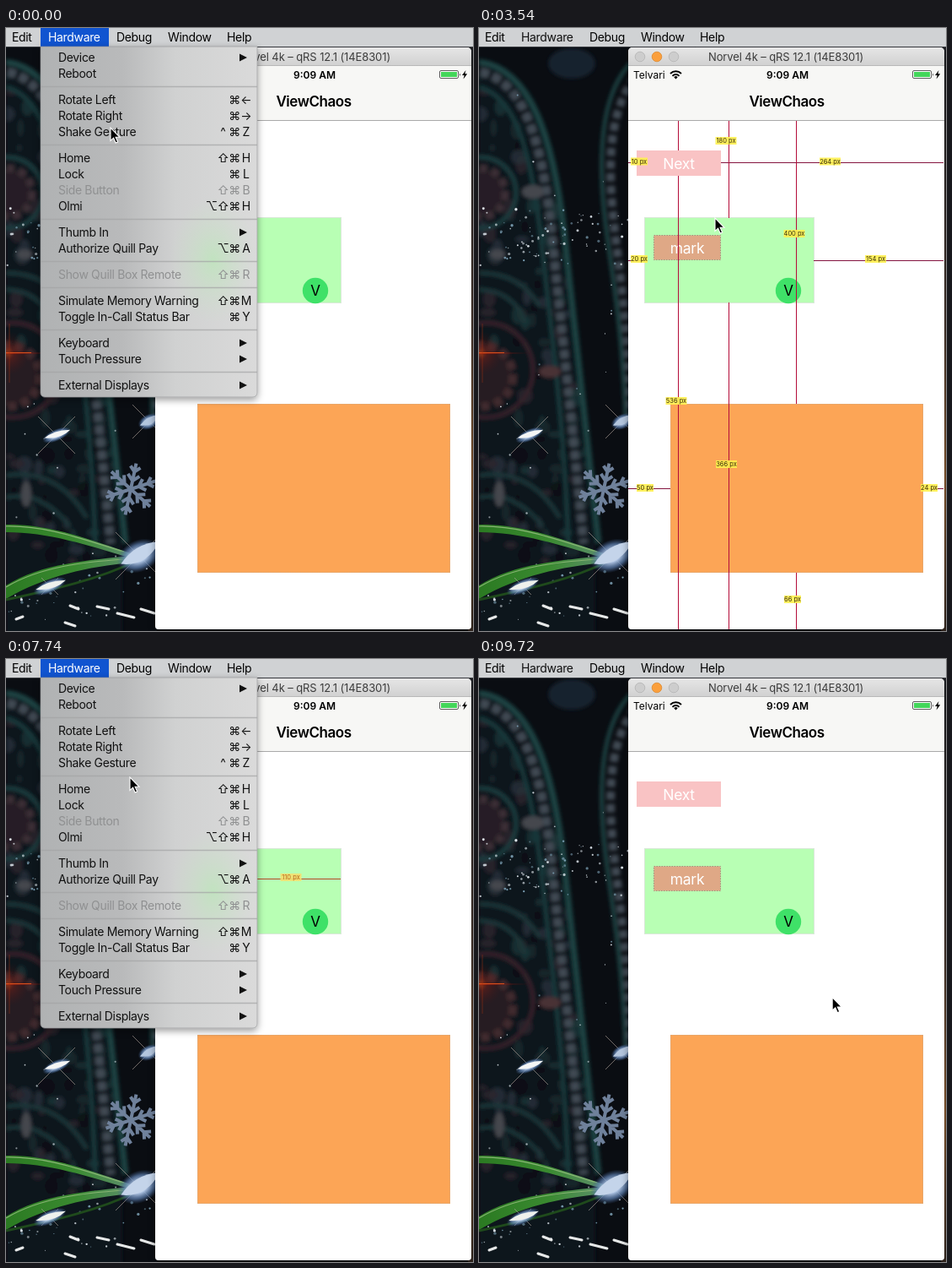
Recreate the animation shown at these times as an HTML page. Size 554x714 px, loop 9.78 s.

```html
<!DOCTYPE html>
<html lang="en">
<head>
<meta charset="utf-8">
<title>ViewChaos</title>
<style>
  html, body { margin: 0; width: 100%; height: 100%; overflow: hidden; background: #0b0f15; }
  svg { display: block; width: 554px; height: 714px; font-family: Inter, Roboto, sans-serif; }
  text { white-space: pre; }
  .menu { font-size: 14px; letter-spacing: -.34px; }
  .keys { font-family: Inter, "DejaVu Sans", sans-serif; text-anchor: middle; letter-spacing: 0; }
  .cjk { font-family: "Noto Sans CJK SC", "Noto Sans CJK", sans-serif; font-size: 17px; text-anchor: middle; }
  .tag { font-size: 7.5px; text-anchor: middle; }
  .mid { text-anchor: middle; }
</style>
</head>
<body>
<svg id="stage" viewBox="0 0 554 714" xmlns="http://www.w3.org/2000/svg">
  <defs>
    <linearGradient id="sheet">
      <stop offset="0" stop-color="#b0b2b3"/><stop offset=".38" stop-color="#b9babb"/>
      <stop offset=".62" stop-color="#d0d1d1"/><stop offset="1" stop-color="#dadada"/>
    </linearGradient>
    <linearGradient id="bar" x2="0" y2="1">
      <stop offset="0" stop-color="#e6e6e6"/><stop offset="1" stop-color="#d0d0d0"/>
    </linearGradient>
    <linearGradient id="edge" x2="0" y2="1">
      <stop offset="0" stop-color="#1a1d22"/><stop offset=".5" stop-color="#46352c"/>
      <stop offset=".75" stop-color="#8a5a30"/><stop offset="1" stop-color="#33261e"/>
    </linearGradient>
    <linearGradient id="leaf">
      <stop offset="0" stop-color="#2b7a22"/><stop offset=".55" stop-color="#3a8a30"/><stop offset="1" stop-color="#5d8f6c"/>
    </linearGradient>
    <radialGradient id="glow">
      <stop offset="0" stop-color="#aef0aa" stop-opacity=".5"/><stop offset="1" stop-color="#c8e8c4" stop-opacity="0"/>
    </radialGradient>
    <radialGradient id="flare">
      <stop offset="0" stop-color="#ff5a14"/><stop offset=".3" stop-color="#a02010" stop-opacity=".6"/>
      <stop offset="1" stop-color="#601010" stop-opacity="0"/>
    </radialGradient>
    <radialGradient id="ice">
      <stop offset="0" stop-color="#fff"/><stop offset=".35" stop-color="#b9cdea"/>
      <stop offset=".7" stop-color="#5f82b4" stop-opacity=".7"/><stop offset="1" stop-color="#3c5a8a" stop-opacity="0"/>
    </radialGradient>
    <filter id="soft"><feGaussianBlur stdDeviation="1.9"/></filter>
    <filter id="fine"><feGaussianBlur stdDeviation=".6"/></filter>
    <filter id="shade" x="-10%" y="-10%" width="120%" height="120%">
      <feDropShadow dx="0" dy="3" stdDeviation="4" flood-opacity=".4"/>
    </filter>
    <clipPath id="wall"><rect y="22" width="554" height="692"/></clipPath>
    <clipPath id="nave"><path d="M0 42C62 50 84 130 97 240S124 480 138 610V640H0Z"/></clipPath>
    <clipPath id="screen"><path d="M177 45H552V708a4 4 0 0 1-4 4H181a4 4 0 0 1-4-4Z"/></clipPath>
  </defs>

  <g id="back" clip-path="url(#wall)">
    <rect width="554" height="714" fill="#0a0d12"/>
    <rect x="548" width="6" height="714" fill="url(#edge)"/>
    <g filter="url(#soft)" fill="none">
      <path d="M0 42C62 50 84 130 97 240S124 480 138 610V720H0Z" fill="#11171d"/>
      <g id="blobs" clip-path="url(#nave)"></g>
      <path d="M0 40C62 48 88 130 101 240S128 480 142 610" stroke="#1b4243" stroke-width="7"/>
      <path d="M0 70C48 82 64 160 76 270S100 460 106 610" stroke="#17393b" stroke-width="5"/>
      <path d="M2 52C56 64 76 140 87 250S112 480 124 610" stroke="#414a52" stroke-width="10" stroke-dasharray="10 5"/>
      <path d="M182 40C150 70 142 130 147 200S168 320 174 460" stroke="#1a3f41" stroke-width="5"/>
      <path d="M186 58C160 90 152 140 158 210S176 320 180 460" stroke="#414a52" stroke-width="10" stroke-dasharray="10 5"/>
      <circle cx="2" cy="195" r="42" stroke="#1a3a3c" stroke-width="5"/>
      <circle cx="2" cy="195" r="29" fill="#281f25" stroke="#3a2f36" stroke-width="9" stroke-dasharray="9 6"/>
      <circle cx="8" cy="405" r="56" stroke="#35222a" stroke-width="5"/>
      <circle cx="4" cy="412" r="36" fill="#251a20" stroke="#40292e" stroke-width="10" stroke-dasharray="10 6"/>
      <path d="M0 290Q50 290 72 330M0 310Q40 310 56 350M0 530Q60 520 96 580M0 556Q40 546 76 590" stroke="#1a3638" stroke-width="5"/>
      <ellipse cx="110" cy="42" rx="28" ry="18" fill="#18232d"/>
      <g fill="#44464e">
        <ellipse cx="64" cy="194" rx="13" ry="8"/><ellipse cx="84" cy="407" rx="13" ry="7" fill="#4a3034"/>
        <ellipse cx="22" cy="268" rx="9" ry="6"/><ellipse cx="24" cy="552" rx="6" ry="15"/>
      </g>
    </g>
    <g id="stars" filter="url(#fine)"></g>
    <ellipse cx="2" cy="385" rx="26" ry="26" fill="url(#flare)" opacity=".5"/>
    <ellipse cx="0" cy="385" rx="62" ry="2" fill="url(#flare)"/>
    <path d="M0 384.500H30" stroke="#d8501c"/>
    <path d="M4 350V420" stroke="#a03010" opacity=".5"/>
    <g filter="url(#fine)">
      <path d="M0 588C52 587 100 606 148 622L146 627C96 612 50 597 0 597Z" fill="url(#leaf)"/>
      <path d="M0 660C42 634 98 630 150 625L148 633C98 638 48 648 0 676Z" fill="url(#leaf)"/>
      <path d="M0 677C60 664 112 652 152 632" fill="none" stroke="#1f4a1c" stroke-width="3"/>
      <path d="M0 590C52 589 98 608 140 620M0 662C42 637 96 632 140 629" fill="none" stroke="#86b472" stroke-width="1.200"/>
    </g>
    <g id="flake" transform="translate(148 546)" filter="url(#fine)" stroke="#6f819b" stroke-width="4" fill="none"></g>
    <g id="comets" filter="url(#fine)"></g>
    <path d="M108 685l14 3M132 693l20 5M160 688l16 5M76 684l10 4M12 700l8-3M70 704l12 4" stroke="#e6e8e8" stroke-width="3" stroke-linecap="round" filter="url(#fine)"/>
  </g>

  <g filter="url(#shade)">
    <path d="M177 45V28a5 5 0 0 1 5-5H547a5 5 0 0 1 5 5V708a4 4 0 0 1-4 4H181a4 4 0 0 1-4-4Z" fill="#fff"/>
  </g>
  <path d="M177 45V28a5 5 0 0 1 5-5H547a5 5 0 0 1 5 5V45Z" fill="url(#bar)"/>
  <path d="M177 44.5H552" stroke="#b9b9b9"/>
  <g stroke-width=".8">
    <circle cx="191" cy="34" r="5.8" fill="#cdcdcd" stroke="#b4b4b4"/>
    <circle cx="211" cy="34" r="5.8" fill="#fb9f3c" stroke="#dc8a30"/>
    <circle cx="231" cy="34" r="5.8" fill="#cdcdcd" stroke="#b4b4b4"/>
  </g>
  <text class="mid" x="364" y="39" font-size="13" letter-spacing="-.1" fill="#3c3c3c">Norvel 4k – qRS 12.1 (14E8301)</text>

  <g clip-path="url(#screen)">
    <rect x="187" y="145" width="100" height="30" fill="#f9c3c4"/>
    <text class="mid" x="237" y="166.500" font-size="17.500" letter-spacing="-.3" fill="#fff">Next</text>
    <rect x="196.500" y="224.500" width="201" height="101" fill="#b8ffb4" stroke="#d9e8d8"/>
    <rect x="207.500" y="245.500" width="79" height="29" fill="#dfa886" stroke="#a58d7e" stroke-dasharray="1.500 1.500"/>
    <text class="mid" x="247" y="266.500" font-size="17.500" letter-spacing="-.3" fill="#fff">mark</text>
    <rect x="227" y="445" width="300" height="200" fill="#fca556"/>
    <path d="M227 445.500H527M227 644.500H527M227.500 445V645M526.500 445V645" stroke="#d6a77c" stroke-dasharray="1 1"/>
    <circle cx="367" cy="311" r="15.200" fill="#3fe168"/>
    <text class="mid" x="367" y="317" font-size="17">V</text>
    <g id="marks"></g>
    <rect x="177" y="45" width="375" height="64" fill="#f7f7f5"/>
    <path d="M177 109.500H552" stroke="#a9a9a9"/>
    <text x="183" y="60" font-size="12">Telvari</text>
    <g fill="none" stroke="#000" stroke-width="1.900">
      <path d="M227 54a9 9 0 0 1 13 0M229.500 56.800a5.500 5.500 0 0 1 8 0"/>
      <path d="M231.300 58.300a3 3 0 0 1 4.400 0L233.500 60.600Z" fill="#000" stroke="none"/>
    </g>
    <text class="mid" x="366" y="60" font-size="12" font-weight="600">9:09 AM</text>
    <rect x="514.500" y="50.500" width="22" height="9" rx="1.500" fill="#fff" stroke="#333" stroke-width=".8"/>
    <rect x="516" y="52" width="19" height="6" fill="#43d65a"/>
    <path d="M538 53.500q1.600 1.500 0 3.500Z"/>
    <path d="M545.500 50l-4.500 6h2.700l-1.200 4.500 4.700-6.300h-2.800Z"/>
    <text class="mid" x="365" y="93" font-size="17" font-weight="600" letter-spacing="-.45">ViewChaos</text>
    <rect id="dim" x="177" y="45" width="375" height="667" fill="#000408"/>
    <g id="alert">
      <rect x="-135" y="-51.500" width="270" height="103" rx="12" fill="#f5f5f5"/>
      <path d="M-135 8H135" stroke="#e6e6e8" stroke-width=".6"/>
      <path d="M0 8V51.500" stroke="#c9c9cc" stroke-width=".8"/>
      <text id="ask" class="cjk" y="-16.500" font-weight="500"></text>
      <text class="cjk" x="-68" y="36" fill="#2f7fc4">取消</text>
      <text class="cjk" x="67" y="36" fill="#2f7fc4">确定</text>
    </g>
  </g>

  <rect width="554" height="22" fill="#d0d2d4"/>
  <path d="M0 22.500H554" stroke="#55585c" stroke-opacity=".6"/>
  <rect id="pick" x="41" width="81" height="22" fill="#1054d0"/>
  <g id="tabs" class="menu"></g>
  <g id="menu" class="menu">
    <path d="M41 22H298V432a5 5 0 0 1-5 5H46a5 5 0 0 1-5-5Z" fill="url(#sheet)" stroke="#8d8f90" stroke-width=".6" filter="url(#shade)"/>
    <ellipse cx="246" cy="275" rx="52" ry="75" fill="url(#glow)"/>
    <rect id="hover" x="41" width="257" height="19" fill="#1f63e0"/>
    <g id="items"></g>
  </g>
  <path id="cursor" d="M0 0V15.500L3.600 12.200 6.100 18 8.600 16.900 6.100 11.300H11Z" fill="#000" stroke="#fff" stroke-width="1.100"/>
</svg>

<script>
const NS = 'http://www.w3.org/2000/svg', LOOP = 9780;
const $ = id => document.getElementById(id);

function add(parent, tag, attrs, text) {
  const el = document.createElementNS(NS, tag);
  for (const k in attrs) el.setAttribute(k, attrs[k]);
  if (text) el.textContent = text;
  parent.appendChild(el);
  return el;
}

let seed = 11;
const rnd = () => (seed = seed * 16807 % 2147483647) / 2147483647;

// Wallpaper: stained glass, star dust, snowflake and comets
const glass = ['#1a2a30', '#26303a', '#1c3436', '#2c262e', '#0a0d12'];
for (let i = 0; i < 150; i++)
  add($('blobs'), 'ellipse', {
    cx: rnd() * 130, cy: 45 + rnd() * 590, rx: 3 + rnd() * 7, ry: 3 + rnd() * 9,
    fill: glass[i % glass.length], opacity: .8
  });

function dust(n, x, y, w, h, size) {
  for (let i = 0; i < n; i++)
    add($('stars'), 'circle', {
      cx: x + rnd() * w, cy: y + (rnd() + rnd()) / 2 * h, r: .5 + rnd() * size,
      fill: rnd() < .6 ? '#e6eef4' : '#7fa4b8', opacity: .5 + rnd() * .5
    });
}
dust(85, 0, 205, 177, 85, 1.2);
dust(25, 0, 30, 177, 660, .7);
dust(22, 60, 600, 117, 110, 1.3);
dust(18, 0, 650, 100, 64, 1.3);

for (let a = 0; a < 360; a += 60)
  add($('flake'), 'path', { d: 'M0 0V-31M-7-17L0-10L7-17M-6-27L0-21L6-27', transform: `rotate(${a + 12})` });

function comet(x, y, rx, ry, ray, fill) {
  const g = add($('comets'), 'g', { transform: `translate(${x} ${y})` });
  add(g, 'path', { d: `M${-ray} ${-ray}L${ray} ${ray}M${ray} ${-ray}L${-ray} ${ray}`, stroke: '#b0a49c', 'stroke-width': .9, opacity: .7 });
  add(g, 'ellipse', { rx, ry, fill: 'url(#ice)', transform: 'rotate(-24)' });
  add(g, 'path', { d: `M${-rx * .8} ${ry * .5}Q${-rx * .2} ${-ry * .8} ${rx * .9} ${-ry * .9}Q${rx * .3} ${ry * .7} ${-rx * .8} ${ry * .5}Z`, fill });
}
comet(60, 482, 18, 7, 22, '#f4f5f5');
comet(170, 466, 14, 9, 20, '#b4c6de');
comet(158, 625, 27, 19, 28, '#c4d4ea');
comet(52, 661, 21, 8, 10, '#eef1ec');

// Menu bar and menu
const tabs = [['Edit', 7], ['Hardware', 50], ['Debug', 131], ['Window', 192], ['Help', 262]]
  .map(([s, x]) => add($('tabs'), 'text', { x, y: 16 }, s));

const rows = [
  [35, 'Device', '>'], [54, 'Reboot', ''], [85, 'Rotate Left', '⌘←'], [104, 'Rotate Right', '⌘→'],
  [123, 'Shake Gesture', '^⌘Z'], [154, 'Home', '⇧⌘H'], [173, 'Lock', '⌘L'], [192, 'Side Button', '⇧⌘B', 1],
  [211, 'Olmi', '⌥⇧⌘H'], [242, 'Thumb In', '>'], [261, 'Authorize Quill Pay', '⌥⌘A'],
  [292, 'Show Quill Box Remote', '⇧⌘R', 1], [323, 'Simulate Memory Warning', '⇧⌘M'],
  [342, 'Toggle In-Call Status Bar', '⌘Y'], [373, 'Keyboard', '>'], [392, 'Touch Pressure', '>'],
  [423, 'External Displays', '>']
].map(([y, name, keys, off]) => {
  const g = add($('items'), 'g', {});
  add(g, 'text', { x: 62, y: y + 5 }, name);
  if (keys === '>') add(g, 'path', { d: `M277 ${y - 4.5}L286 ${y}L277 ${y + 4.5}Z` });
  else [...keys].reverse().forEach((k, i) =>
    add(g, 'text', { x: 285 - i * 13.7, y: y + 5, class: 'keys' }, k));
  return { y, g, off };
});
for (const y of [70, 139, 227, 277, 308, 358, 408])
  add($('items'), 'path', { d: `M41 ${y - .5}H298`, stroke: '#a3a4a5', 'stroke-width': 1.5, opacity: .7 });

// Measuring marks: on and off times, lines, tags
const marks = [
  [1950, 6250, 'M236.5 109V145M236.5 175V712', 'M177 159.5H187M287 159.5H551',
    [[190, 158, 10], [416.5, 158, 264], [234, 441.5, 536]]],
  [2480, 5680, 'M296.5 109V225M296.5 325V712', 'M177 275.5H197M397 275.5H551',
    [[293, 133.5, 180], [190, 273.5, 20], [470.5, 273.5, 154], [293.5, 516.5, 366]]],
  [3080, 4650, 'M376.5 109V445M376.5 645V712', 'M177 545.5H227M527 545.5H551',
    [[374, 243.5, 400], [197, 544.5, 50], [534, 544.5, 24], [372, 676.5, 66]]],
  [3900, 9280, 'M246.5 225V245M246.5 275V325', 'M197 260.5H207M287 260.5H397',
    [[241, 233.5, 20], [209, 258.5, 10], [338, 258.5, 110], [241, 298.5, 50]]]
].map(([on, off, v, h, tags], n) => {
  const g = add($('marks'), 'g', {}), inner = n === 3;
  add(g, 'path', { d: v, stroke: inner ? '#b5482a' : '#b40c38' });
  add(g, 'path', { d: h, stroke: inner ? '#b5482a' : '#84143f' });
  for (const [x, y, px] of tags) {
    const w = px > 99 ? 25 : 20;
    add(g, 'rect', { x: x - w / 2, y: y - 4.5, width: w, height: 9, fill: inner ? '#f4e070' : '#fff04e', opacity: .9 });
    add(g, 'text', { x, y: y + 2.7, class: 'tag', fill: inner ? '#b8641c' : '#3a300a' }, px + ' px');
  }
  return { on, off, g };
});

// Pointer stops: time, x, y
const path = [
  [0, 124, 118], [200, 124, 118], [850, 436, 410], [1150, 438, 412], [1440, 319, 322], [1850, 240, 165],
  [2050, 240, 165], [2400, 310, 270], [2560, 310, 270], [3000, 380, 540], [3160, 380, 540], [3540, 280, 225],
  [3800, 245, 262], [3980, 245, 262], [4500, 370, 540], [4760, 370, 540], [5400, 317, 301], [5580, 300, 290],
  [5750, 300, 290], [6150, 238, 165], [6350, 238, 165], [6900, 82, 12], [7060, 82, 12], [7740, 147, 140],
  [8000, 125, 121], [8250, 125, 121], [8640, 454, 525], [9000, 442, 416], [9350, 440, 413], [9780, 418, 400]
];

const clamp = v => Math.max(0, Math.min(1, v));
const ramp = (t, start, dur) => clamp((t - start) / dur);

function pointer(t) {
  let i = 1;
  while (i < path.length - 1 && path[i][0] <= t) i++;
  const [t0, x0, y0] = path[i - 1], [t1, x1, y1] = path[i];
  const p = ramp(t, t0, t1 - t0), k = p * p * (3 - 2 * p);
  return [x0 + (x1 - x0) * k, y0 + (y1 - y0) * k];
}

function draw(t) {
  const [x, y] = pointer(t);
  $('cursor').setAttribute('transform', `translate(${x} ${y})`);

  const late = t > 5000;
  const shut = late ? 8260 : 160;
  const open = !late || t >= 7000 ? 1 - ramp(t, shut, 180) : 0;
  $('menu').setAttribute('opacity', open);
  $('pick').setAttribute('opacity', open > 0 ? 1 : 0);
  tabs[1].setAttribute('fill', open > 0 ? '#fff' : '#111');
  const hy = t >= shut ? 123 : y;
  const hit = t < 60 ? null : rows.find(r => !r.off && Math.abs(r.y - hy) < 9.5);
  for (const r of rows) r.g.setAttribute('fill', r === hit ? '#fff' : r.off ? '#8f9091' : '#111');
  $('hover').setAttribute('opacity', hit ? 1 : 0);
  if (hit) $('hover').setAttribute('y', hit.y - 9.5);

  for (const m of marks)
    m.g.setAttribute('opacity', ramp(t, m.on, 120) * (1 - ramp(t, m.off, 120)));

  const grow = ramp(t, late ? 8552 : 500, 220);
  const shown = grow * (1 - ramp(t, late ? 9260 : 1100, 220));
  $('dim').setAttribute('opacity', .4 * shown);
  $('alert').setAttribute('opacity', shown);
  $('alert').setAttribute('transform', `translate(364.5 378.7) scale(${1 + .228 * (1 - grow)})`);
  $('ask').textContent = late ? '关闭标记界面功能' : '启动标记界面功能';
}

const start = performance.now();
function tick() {
  draw((performance.now() - start) % LOOP);
  requestAnimationFrame(tick);
}
draw(0);
requestAnimationFrame(tick);
</script>
</body>
</html>
```
